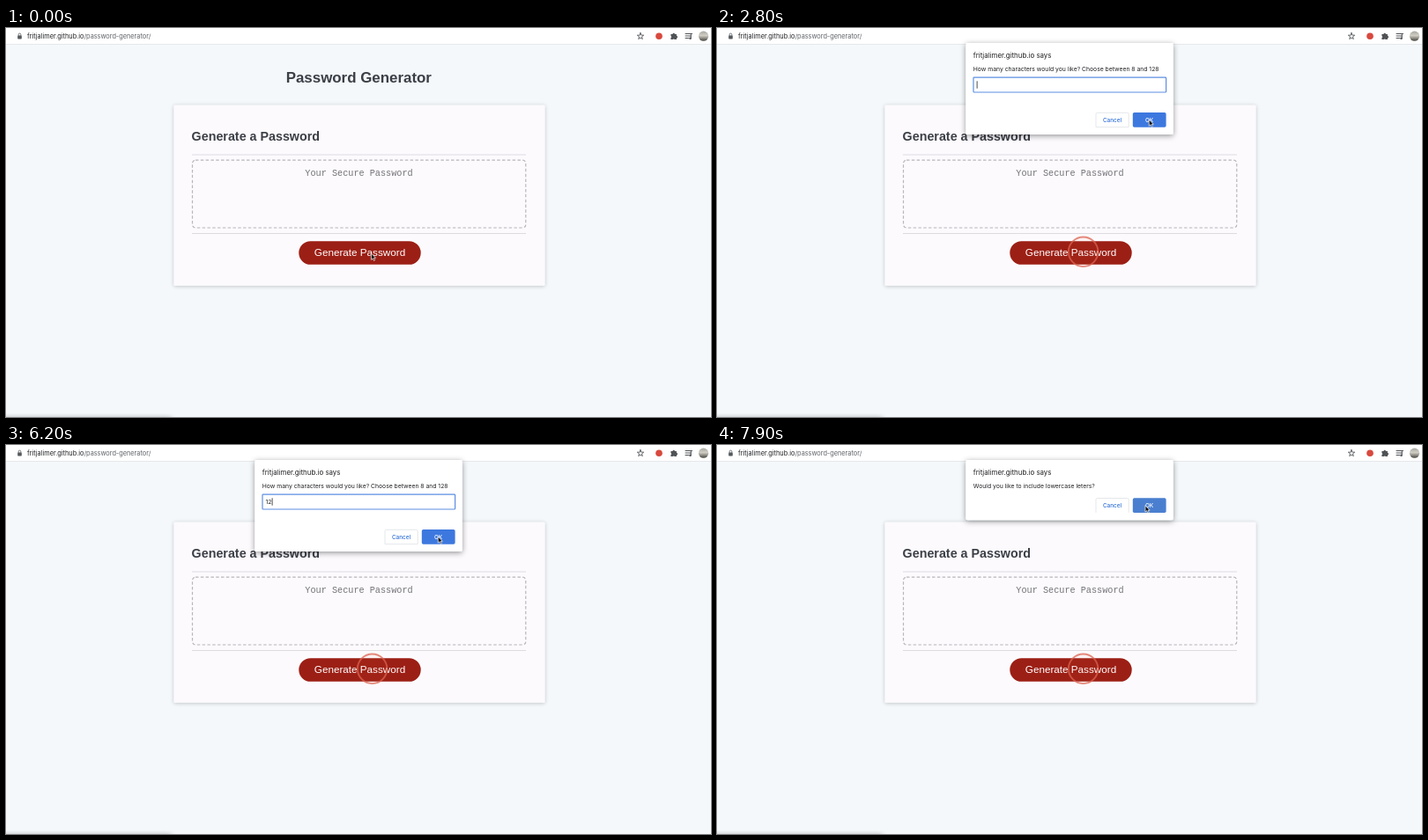
These frames come from a looping animation (800x442 px, 8 s). An HTML page:

```html
<!DOCTYPE html>
<html lang="en">
<head>
<meta charset="utf-8">
<title>Password Generator</title>
<style>
  html, body { margin: 0; width: 100%; height: 100%; overflow: hidden; background: #f4f8fb; }
  svg { display: block; width: 100vw; height: 100vh; }
  text { font-family: Inter, Roboto, sans-serif; white-space: pre; }
  .head { font: bold 16.9px "Liberation Sans", sans-serif; fill: #3b3f46; }
  .ui { font-size: 6.8px; fill: #202124; }
  .btn { font-size: 6.4px; font-weight: 500; text-anchor: middle; }
  .line { fill: none; stroke-linecap: round; stroke-linejoin: round; }
</style>
</head>
<body>
<svg viewBox="0 0 800 442" xmlns="http://www.w3.org/2000/svg">
  <defs>
    <filter id="soft" x="-10%" y="-20%" width="120%" height="150%">
      <feDropShadow dx="0" dy="0.6" stdDeviation="2" flood-color="#000" flood-opacity=".24"/>
    </filter>
    <filter id="deep" x="-10%" y="-20%" width="120%" height="150%">
      <feDropShadow dx="0" dy="1.5" stdDeviation="3" flood-color="#000" flood-opacity=".42"/>
    </filter>
    <linearGradient id="photo" x2="0" y2="1">
      <stop offset="0" stop-color="#a9aaa2"/>
      <stop offset=".45" stop-color="#d0cdc4"/>
      <stop offset="1" stop-color="#45443d"/>
    </linearGradient>
  </defs>

  <rect width="800" height="442" fill="#f4f8fb"/>

  <!-- address bar -->
  <rect width="800" height="18" fill="#fff"/>
  <rect y="18" width="800" height="1" fill="#e6e8ea"/>
  <rect x="13.2" y="8.4" width="4.6" height="4" rx=".6" fill="#55585c"/>
  <path class="line" d="M14.2 8.6V7.4a1.3 1.3 0 0 1 2.6 0V8.6" stroke="#55585c" stroke-width=".8"/>
  <text x="24" y="11.8" font-size="7.34" fill="#202124">fritjalimer.github.io<tspan fill="#5f6368">/password-generator/</tspan></text>
  <path id="star" class="line" stroke="#55585c" stroke-width=".9"/>
  <circle cx="741" cy="9.3" r="3.8" fill="#d8493e"/>
  <path fill="#505356" d="M754.4 7h2.1a1.2 1.2 0 0 1 2.4 0h2v2a1.2 1.2 0 0 1 0 2.4v1.7h-2.1a1.2 1.2 0 0 0-2.2 0h-2.2v-2a1.2 1.2 0 0 0 0-2.2z"/>
  <path class="line" d="M771 6.5h6.5M771 9h6.5M771 11.5h3.5M777.2 12V6.6h1.4" stroke="#505356" stroke-width="1"/>
  <circle cx="776.4" cy="11.8" r="1.2" fill="#505356"/>
  <circle cx="791.5" cy="9.2" r="5.6" fill="url(#photo)"/>

  <!-- page -->
  <text class="head" x="400.3" y="62" text-anchor="middle">Password Generator</text>
  <rect x="190.5" y="87.8" width="421" height="205" rx="1.5" fill="#fcfafd" filter="url(#soft)"/>
  <text class="head" x="210.6" y="128.3" style="font-size:14.3px">Generate a Password</text>
  <path d="M211 144H590M211 233.5H590" stroke="#dddbe0"/>
  <rect x="211.5" y="150.2" width="378.3" height="76.8" rx="3.5" fill="none" stroke="#b8b6bb" stroke-width="1.2" stroke-dasharray="3.5 2.3"/>
  <text x="400.5" y="168" text-anchor="middle" fill="#737277" style="font:10.2px 'Liberation Mono',monospace">Your Secure Password</text>
  <rect x="332.3" y="242.2" width="138.4" height="26.6" rx="13.3" fill="#9c1f15"/>
  <text x="401.5" y="259.2" text-anchor="middle" fill="#fff" style="font:11.7px 'Liberation Sans',sans-serif">Generate Password</text>
  <rect x="-10" y="442" width="197" height="20" fill="#999" filter="url(#deep)"/>
  <circle id="ring" cx="415.6" cy="254.3" fill="#e2604c" fill-opacity=".06" stroke="#dd6552" stroke-opacity=".75" stroke-width="1.9"/>

  <!-- dialog -->
  <g id="dialog">
    <rect id="panel" x="282.3" y="17" width="235.5" rx="2" fill="#fff" filter="url(#deep)"/>
    <text class="ui" x="290.8" y="33.8" style="font-size:7.9px">fritjalimer.github.io says</text>
    <text id="message" class="ui" x="290.8" y="49.2"></text>
    <g id="field">
      <rect x="291" y="56.2" width="218.6" height="16.8" rx=".8" fill="#fff" stroke="#5c8ee2" stroke-width="1.2"/>
      <text id="typed" class="ui" x="294.6" y="66.9"></text>
      <rect id="caret" y="60.3" width=".8" height="8.4" fill="#222"/>
    </g>
    <g id="buttons">
      <path id="cancel" fill="none" stroke="#dfe1e5" stroke-width=".8"/>
      <text class="btn" x="448.5" y="10.6" fill="#2f6fd6">Cancel</text>
      <rect id="ok" x="471.8" y="0" width="37.8" height="16.8" rx="1.8"/>
      <text class="btn" x="490.6" y="10.6" fill="#fff">OK</text>
    </g>
  </g>

  <path id="cursor" d="M0 0V7.3L1.7 5.8L2.9 8.4L4.2 7.8L3 5.3H5.2Z" fill="#111" stroke="#fff" stroke-width=".7" stroke-linejoin="round"/>
</svg>
<script>
const LOOP = 8000, OPEN = 1500, CONFIRM = 6600;
const $ = id => document.getElementById(id);
const set = (id, name, value) => $(id).setAttribute(name, value);
const show = (id, on) => set(id, 'visibility', on ? 'inherit' : 'hidden');

// time, x, y of the pointer tip
const path = [
  [0, 414.4, 256], [300, 414.4, 256], [900, 414.4, 252.8], [1600, 414.4, 252.8],
  [2600, 490.2, 104], [7000, 490.2, 104], [7850, 486, 68.8], [LOOP, 486, 68.8]
];

function pointer(t) {
  const i = path.findIndex(p => p[0] > t);
  const [t0, x0, y0] = path[i - 1], [t1, x1, y1] = path[i];
  const u = (t - t0) / (t1 - t0), e = u * u * (3 - 2 * u);
  return [x0 + (x1 - x0) * e, y0 + (y1 - y0) * e];
}

const points = [...Array(10).keys()].map(i => {
  const r = i % 2 ? 1.6 : 3.9, a = i * Math.PI / 5;
  return (720 + r * Math.sin(a)).toFixed(2) + ' ' + (9.4 - r * Math.cos(a)).toFixed(2);
});
set('star', 'd', 'M' + points.join('L') + 'Z');

function draw(t) {
  const [x, y] = pointer(t);
  set('cursor', 'transform', `translate(${x} ${y})`);

  show('ring', t >= 1100);
  set('ring', 'r', Math.min(16.8, 8 + (t - 1100) / 200 * 8.8));

  show('dialog', t >= OPEN);
  const asking = t < CONFIRM, top = asking ? 96 : 60.2;
  set('panel', 'height', asking ? 104 : 68.3);
  $('message').textContent = asking
    ? 'How many characters would you like? Choose between 8 and 128'
    : 'Would you like to include lowercase leters?';
  show('field', asking);

  const typed = t < 5600 ? '' : t < 5900 ? '1' : '12';
  $('typed').textContent = typed;
  show('caret', asking && t >= OPEN && (typed || t % 1000 >= 400));
  set('caret', 'x', 294.7 + [0, 3, 7][typed.length]);

  set('buttons', 'transform', `translate(0 ${top})`);
  set('cancel', 'd', 'M430 16.6V1.8Q430 .3 431.5 .3H465.7Q467.2 .3 467.2 1.8V16.6' + (asking ? 'Z' : ''));
  const hover = x > 471.8 && x < 509.6 && y > top && y < top + 16.8;
  set('ok', 'fill', !hover ? '#2f6fdb' : asking ? '#3d78df' : '#4a7fd0');
}

function frame(now) {
  draw(now % LOOP);
  requestAnimationFrame(frame);
}
draw(0);
requestAnimationFrame(frame);
</script>
</body>
</html>
```
